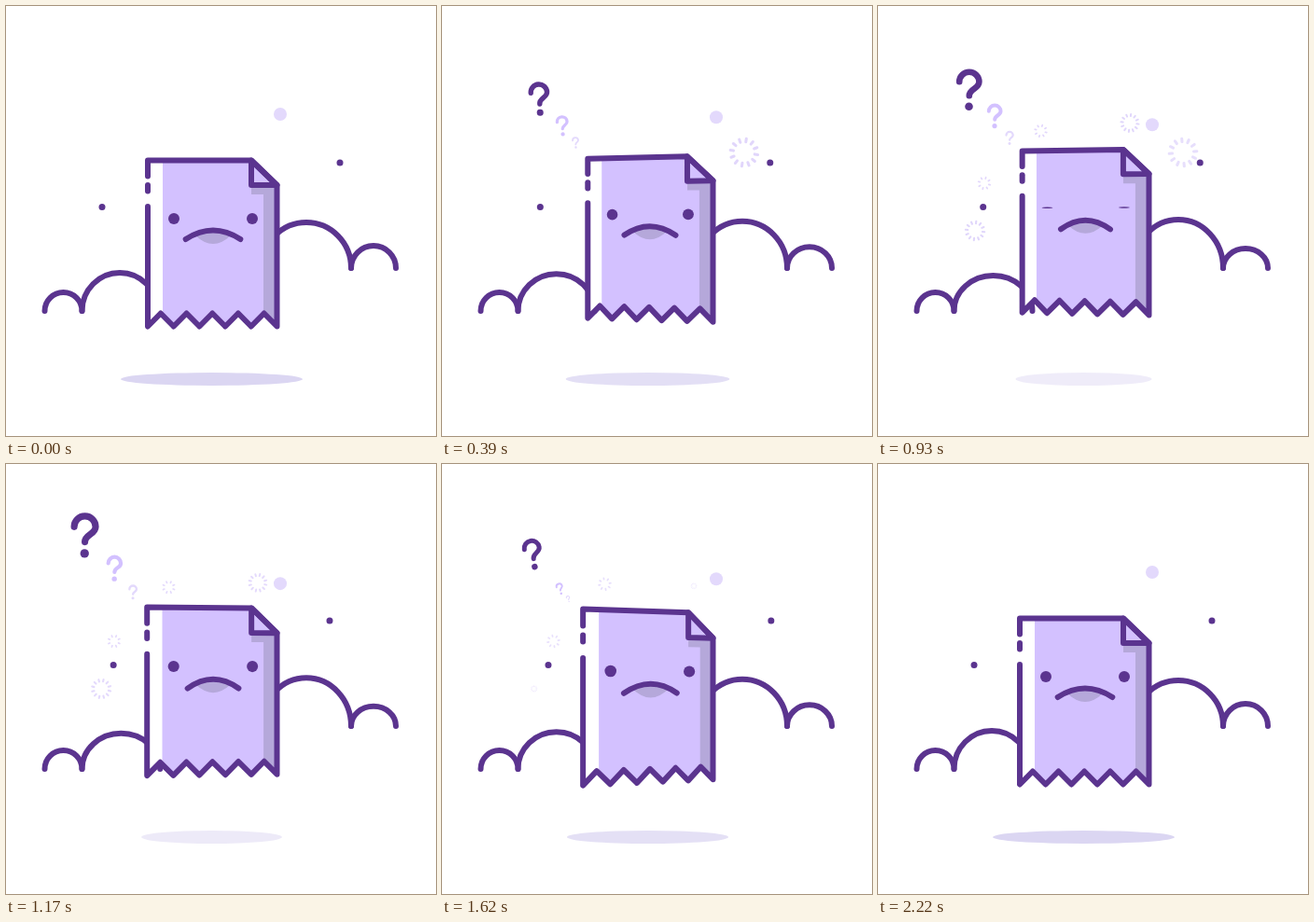
Write an HTML page with a canvas that moves like this. It is 461 by 461 pixels and loops after 2.25 s.

```html
<!DOCTYPE html>
<html lang="en">
<head>
<meta charset="utf-8">
<title>Sad receipt</title>
<style>
  html, body { margin: 0; width: 100%; height: 100%; overflow: hidden; background: #fff; }
  canvas { display: block; width: 461px; height: 461px; }
</style>
</head>
<body>
<canvas id="stage" width="461" height="461"></canvas>
<script>
const ctx = document.getElementById('stage').getContext('2d');
const LOOP = 2250, STEP = 30, TAU = Math.PI * 2;
const INK = '#5b348f', LILAC = '#d3c1ff', SHADE = '#b5a8da', PALE = '#e3d9fc';

const clamp = v => Math.max(0, Math.min(1, v));
const mix = (a, b, k) => a + (b - a) * k;
const ease = (t, from, to) => 0.5 - 0.5 * Math.cos(Math.PI * clamp((t - from) / (to - from)));
const swing = (t, peak) => t < peak ? ease(t, 0, peak) : 1 - ease(t, peak, LOOP);

// Keys are [time, ...values], eased between neighbours.
function track(t, keys) {
  let i = 0;
  while (i < keys.length - 2 && t > keys[i + 1][0]) i++;
  const a = keys[i], b = keys[i + 1], k = ease(t, a[0], b[0]);
  return a.slice(1).map((v, n) => mix(v, b[n + 1], k));
}

function disc(x, y, rx, ry, color) {
  ctx.beginPath();
  ctx.ellipse(x, y, rx, ry, 0, 0, TAU);
  ctx.fillStyle = color;
  ctx.fill();
}

function poly(points, close) {
  ctx.beginPath();
  points.forEach(p => ctx.lineTo(p[0], p[1]));
  if (close) ctx.closePath();
}

function stroke(color = INK, width = 6) {
  ctx.strokeStyle = color;
  ctx.lineWidth = width;
  ctx.stroke();
}

function arch(left, base, rx, ry) {
  ctx.beginPath();
  ctx.ellipse(left + rx, base, rx, ry, 0, Math.PI, TAU);
  stroke();
}

function clouds(lift) {
  arch(41.5, 327, 20, 20);
  arch(81.5, 327, 40.5 + 1.5 * lift, 41 - 3 * lift);
  const rx = 48;
  arch(370 - 2 * rx, 281, rx, 49 + 3 * lift);
  arch(370, 281, 24, 24 - 3 * lift);
}

// The sheet turns about its right edge, seen in perspective.
function projector(angle, dy) {
  const hinge = 290.5, depth = 506, cx = 221, cy = 240;
  return (x, y) => {
    const d = hinge - x;
    const s = depth / (depth + d * Math.sin(angle));
    return [cx + (hinge - d * Math.cos(angle) - cx) * s, cy + (y - cy) * s + dy, s];
  };
}

function face(at, t, lift) {
  const blink = 1 - 0.88 * (ease(t, 810, 915) - ease(t, 945, 1050));
  for (const x of [180, 264]) {
    const [ex, ey, s] = at(x, 228);
    disc(ex, ey, 6 * s, 6 * s * blink, INK);
  }
  const half = 29.3 - 2.3 * lift, end = 250 + 1.5 * lift;
  const curve = (w, y, bend) => {
    const a = at(222 - w, y), c = at(222, bend), b = at(222 + w, y);
    ctx.moveTo(a[0], a[1]);
    ctx.quadraticCurveTo(c[0], c[1], b[0], b[1]);
  };
  ctx.beginPath();
  curve(19, 246 + lift, 264 + lift);
  curve(19, 246 + lift, 236 + lift);
  ctx.fillStyle = SHADE;
  ctx.fill();
  ctx.beginPath();
  curve(half, end, 231 + lift);
  stroke();
}

function sheet(t, lift) {
  const [degrees] = track(t, [[0, 0], [600, 12], [1600, -12.5], [2220, 0]]);
  const at = projector(degrees * Math.PI / 180, -12 * lift);
  const L = 152, R = 290.5, T = 165.5, B = 343.5, F = 263, FY = 192;
  const map = list => list.map(p => at(p[0], p[1]));
  const block = (color, list) => {
    poly(map(list), true);
    ctx.fillStyle = color;
    ctx.fill();
  };
  const zigzag = [];
  for (let i = 0; i <= 10; i++) zigzag.push([mix(R, L, i / 10), i % 2 ? 329.5 : B]);

  ctx.save();
  poly(map([[L, T], [F, T], [R, FY], ...zigzag]), true);
  ctx.fillStyle = '#fff';
  ctx.fill();
  ctx.clip();
  block(LILAC, [[168, T], [R, T], [R, B], [168, B]]);
  block(SHADE, [[F, FY], [R, FY], [R, B], [276, B], [276, 202], [F, 202]]);
  ctx.restore();

  block(LILAC, [[F, T], [R, FY], [F, FY]]);
  poly(map([[F, T], [R, FY], [F, FY]]), true);
  stroke();
  poly(map([[L, 182.5], [L, T], [F, T], [R, FY], ...zigzag, [L, 215]]));
  stroke();
  poly(map([[L, 192], [L, 198.5]]));
  stroke();
  face(at, t, lift);
}

function question(x, y, scale, tilt, color) {
  if (scale < 0.01) return;
  ctx.save();
  ctx.translate(x, y);
  ctx.rotate(tilt);
  ctx.scale(scale, scale);
  ctx.beginPath();
  ctx.arc(0.3, -8.7, 10.6, Math.PI, TAU);
  ctx.bezierCurveTo(10.9, -1, 0.3, -1.5, 0.3, 6.3);
  stroke(color, 6.6);
  disc(0, 17.7, 4.3, 4.3, color);
  ctx.restore();
}

function questions(t) {
  const marks = [
    { color: PALE, end: 1800, home: [138, 153], keys: [[510, 144, 145.5, 0.33], [930, 141, 141.5, 0.34], [1380, 132, 134, 0.37]] },
    { color: LILAC, end: 1800, home: [140, 155], keys: [[510, 127, 124, 0.59], [930, 125, 118, 0.6], [1380, 109, 107, 0.66]] },
    { color: INK, end: 1940, home: [143, 157], keys: [[510, 97.5, 90, 0.96], [930, 97.5, 90, 1], [1380, 73.5, 66, 1.15]] }
  ];
  for (const { color, end, home, keys } of marks) {
    const shown = ease(t, 30, 510) - ease(t, 1410, end);
    const [x, y, scale] = track(t, keys);
    question(mix(home[0], x, shown), mix(home[1], y, shown), scale * shown, -0.5 * (1 - shown), color);
  }
}

function burst(t, { from, to, x, y, vx = 0, vy = 0, r, count }) {
  const size = ease(t, from, from + 130) * (1 - ease(t, to - 160, to));
  if (size < 0.01) return;
  ctx.save();
  ctx.globalAlpha = 1 - 0.4 * clamp((t - from) / (to - from));
  ctx.translate(x + vx * t / 1000, y + vy * t / 1000);
  ctx.rotate((t - from) / 1000 * 0.5);
  ctx.scale(size, size);
  ctx.beginPath();
  for (let i = 0; i < count; i++) {
    const c = Math.cos(i / count * TAU), s = Math.sin(i / count * TAU);
    ctx.moveTo(c * r * 0.72, s * r * 0.72);
    ctx.lineTo(c * r * 0.93, s * r * 0.93);
  }
  stroke('#ddd1fb', r > 9 ? r * 0.19 : 1.7);
  ctx.restore();
}

const bursts = [
  { from: 60, to: 1170, x: 321.6, y: 157, vx: 5.8, r: 16, count: 12 },
  { from: 400, to: 2010, x: 174.5, y: 141, vy: -7.6, r: 7, count: 8 },
  { from: 400, to: 1900, x: 106.5, y: 190, vx: 8, r: 7, count: 8 },
  { from: 690, to: 1680, x: 270, y: 118.2, vy: 7.8, r: 10.3, count: 12 },
  { from: 690, to: 1680, x: 111.3, y: 241, vx: -7.8, r: 11, count: 12 }
];

function draw(t) {
  const lift = swing(t, 900);
  ctx.fillStyle = '#fff';
  ctx.fillRect(0, 0, 461, 461);
  ctx.lineCap = ctx.lineJoin = 'round';

  ctx.globalAlpha = 1 - 0.55 * lift;
  disc(220.5, 400, 97.5 - 24.5 * lift, 7, '#dbd6f2');
  ctx.globalAlpha = 1;

  disc(294, 116 + 12.2 * swing(t, 1125), 7, 7, PALE);
  disc(358 - 13 * swing(t, 800), 168, 3.5, 3.5, INK);
  disc(103 + 13 * swing(t, 1400), 215.5, 3.5, 3.5, INK);
  bursts.forEach(b => burst(t, b));
  questions(t);
  clouds(lift);
  sheet(t, lift);
}

const start = performance.now();
function tick() {
  const t = (performance.now() - start) % LOOP;
  draw(Math.floor(t / STEP) * STEP);
  requestAnimationFrame(tick);
}
tick();
</script>
</body>
</html>
```
